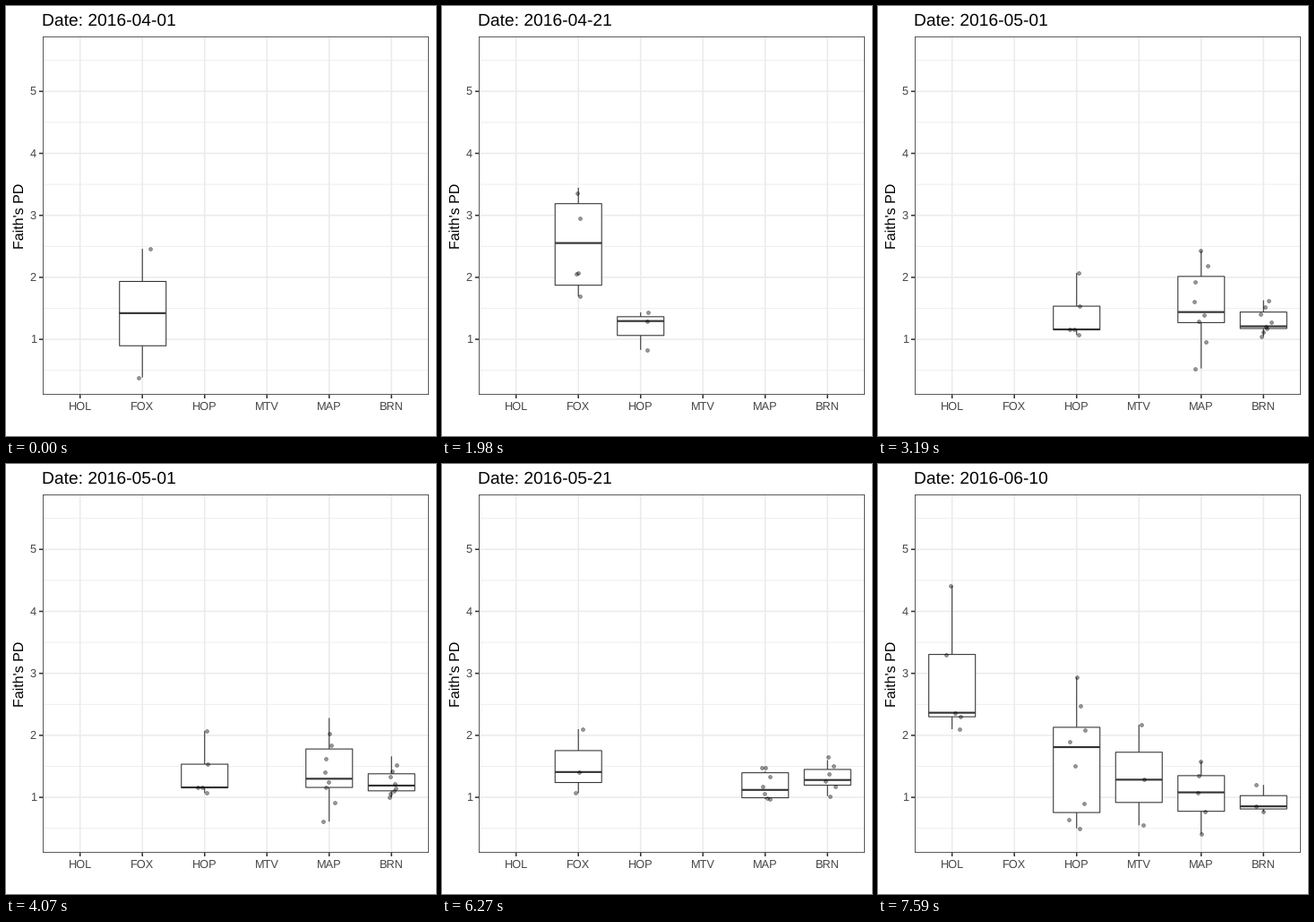
These frames come from a looping animation (480 by 480 pixels, 8000 ms). A matplotlib script:

```python
import numpy as np
import matplotlib.pyplot as plt
from matplotlib.animation import FuncAnimation
from matplotlib.collections import LineCollection, PolyCollection
from matplotlib.patches import Rectangle

SIZE, DPI = 480, 72            # at 72 dpi one point is one pixel
LOOP, STEP = 8000, 20
FIRST, PERIOD, TICK = 770, 1100, 110

plt.rcParams["font.family"] = "Liberation Sans"
plt.rcParams["text.hinting"] = "none"
DARK, LABEL, GRID = "#333333", "#464646", "#ebebeb"
LEFT, RIGHT, TOP, BOTTOM = 41, 472, 34, 434
JITTER, HALF_BOX = 9.3, 26

SITES = ["HOL", "FOX", "HOP", "MTV", "MAP", "BRN"]
START = np.datetime64("2016-04-01")

# Per site and date: sample count, then evenly spaced quantiles.
SUMMARY = {
    "HOL": {4: (9, 1.27, 1.475, 1.585, 2.33, 3.14),
            6: (5, 1.5, 1.8, 2.1, 2.6, 3.2),
            7: (5, 2.1, 2.3, 2.365, 3.305, 4.41)},
    "FOX": {0: (2, 0.385, 2.46),
            1: (5, 1.075, 1.4, 1.7, 1.785, 2.06),
            2: (4, 2.0, 2.11, 2.98, 3.89, 4.14),
            5: (3, 1.26, 1.44, 2.15),
            6: (3, 0.69, 1.345, 2.0)},
    "HOP": {1: (3, 0.83, 1.295, 1.435),
            3: (5, 1.07, 1.155, 1.16, 1.535, 2.07),
            7: (8, 0.5, 0.755, 1.81, 2.13, 2.935)},
    "MTV": {7: (3, 0.55, 1.285, 2.17)},
    "MAP": {2: (12, 0.78, 0.79, 0.93, 0.97, 0.99),
            3: (8, 0.53, 1.27, 1.44, 2.015, 2.425),
            4: (11, 0.765, 0.94, 1.02, 1.31, 1.99),
            5: (7, 0.96, 0.98, 1.13, 1.47, 1.48),
            6: (5, 1.0, 1.02, 1.1, 1.25, 1.3),
            7: (5, 0.41, 0.775, 1.08, 1.35, 1.58)},
    "BRN": {2: (6, 0.55, 0.68, 0.85, 1.02, 1.23),
            3: (8, 1.05, 1.175, 1.21, 1.44, 1.63),
            4: (10, 0.9, 0.965, 1.15, 1.26, 1.725),
            5: (6, 1.055, 1.22, 1.295, 1.475, 1.65),
            6: (5, 0.95, 1.15, 1.25, 1.4, 1.5),
            7: (3, 0.77, 0.855, 1.2)},
}
rng = np.random.default_rng(16)


def sample(count, *quantiles):
    """Jittered dots that follow the quantiles, and their box."""
    def at(n):
        return np.interp(np.linspace(0, 1, n),
                         np.linspace(0, 1, len(quantiles)), quantiles)
    jitter = rng.uniform(-JITTER, JITTER, count)
    return np.column_stack([jitter, at(count)]), at(5)


DATA = [{k: sample(*row) for k, row in SUMMARY[name].items()}
        for name in SITES]


def px(i):
    return 82.7 + 69.52 * i


def py(v):
    return 441.3 - 69.2 * v


def blend(site, k, f):
    """Pose of one site, a fraction f of the way from date k to k + 1."""
    dots, box = site[k]
    if f and k + 1 in site:
        after, after_box = site[k + 1]
        m = min(len(dots), len(after))
        dots = dots.copy()
        dots[:m] += f * (after[:m] - dots[:m])
        box = box + f * (after_box - box)
    return dots, box


def clock(t):
    """Date index and fraction at time t."""
    if t < FIRST:
        return 0, 0
    k, rest = divmod(t - FIRST, PERIOD)
    step = rest // TICK + 1
    return (k + 1, 0) if step >= 3 else (k, step / 3)


fig = plt.figure(figsize=(SIZE / DPI, SIZE / DPI), dpi=DPI, facecolor="white")
ax = fig.add_axes([0, 0, 1, 1])
ax.set(xlim=(0, SIZE), ylim=(SIZE, 0))
ax.axis("off")


def add(art):
    art.set_snap(False)
    return ax.add_collection(art, autolim=False)


def lines(segs, color, width, z):
    return add(LineCollection(segs, colors=color, linewidths=width, zorder=z,
                              capstyle="butt"))


def across(values, x0=LEFT, x1=RIGHT):
    return [[(x0, py(v)), (x1, py(v))] for v in values]


def down(y0, y1):
    return [[(px(i), y0), (px(i), y1)] for i in range(len(SITES))]


values = range(1, 6)
lines(across(np.arange(6) + 0.5), GRID, 0.8, 1)
lines(across(values) + down(TOP, BOTTOM), GRID, 1.55, 1)
lines(across(values, LEFT - 4, LEFT) + down(BOTTOM, BOTTOM + 4), DARK, 1.55, 6)
ax.add_patch(Rectangle((LEFT + 0.4, TOP + 0.4), RIGHT - LEFT - 0.8,
                       BOTTOM - TOP - 0.8, fill=False, ec=DARK, lw=0.8,
                       zorder=6, snap=False))

for i, name in enumerate(SITES):
    ax.text(px(i), 450.8, name, size=12.8, color=LABEL, ha="center",
            va="baseline")
for v in values:
    ax.text(33.9, py(v) + 4.2, str(v), size=12.8, color=LABEL, ha="right",
            va="baseline")
ax.text(19.6, 234.2, "Faith's PD", size=16, rotation=90, ha="center",
        va="baseline", rotation_mode="anchor")
title = ax.text(40.5, 21.6, "", size=19.2, va="baseline")

whiskers = lines([], DARK, 1.07, 2)
boxes = add(PolyCollection([], facecolors="white", edgecolors=DARK,
                           linewidths=1.07, zorder=3))
medians = lines([], DARK, 2.13, 4)
points = ax.scatter([], [], s=15.2, facecolors=(0, 0, 0, 0.4),
                    edgecolors=(0, 0, 0, 0.4), linewidths=0.75, zorder=5,
                    snap=False)


def draw(n):
    k, f = clock(n * STEP + STEP // 2)
    stems, rects, mids, spots = [], [], [], []
    for i, site in enumerate(DATA):
        if k not in site:
            continue
        dots, box = blend(site, k, f)
        x = px(i)
        lo, q1, mid, q3, hi = py(box)
        l, r = x - HALF_BOX, x + HALF_BOX
        stems += [[(x, lo), (x, q1)], [(x, q3), (x, hi)]]
        rects.append([(l, q1), (r, q1), (r, q3), (l, q3)])
        mids.append([(l, mid), (r, mid)])
        spots += [(x + dx, py(v)) for dx, v in dots]
    whiskers.set_segments(stems)
    boxes.set_verts(rects)
    medians.set_segments(mids)
    points.set_offsets(spots)
    title.set_text(f"Date: {START + 10 * (k + (f > 0.5))}")
    return whiskers, boxes, medians, points, title


anim = FuncAnimation(fig, draw, frames=LOOP // STEP, interval=STEP,
                     repeat=True, repeat_delay=0)
plt.show()
```
